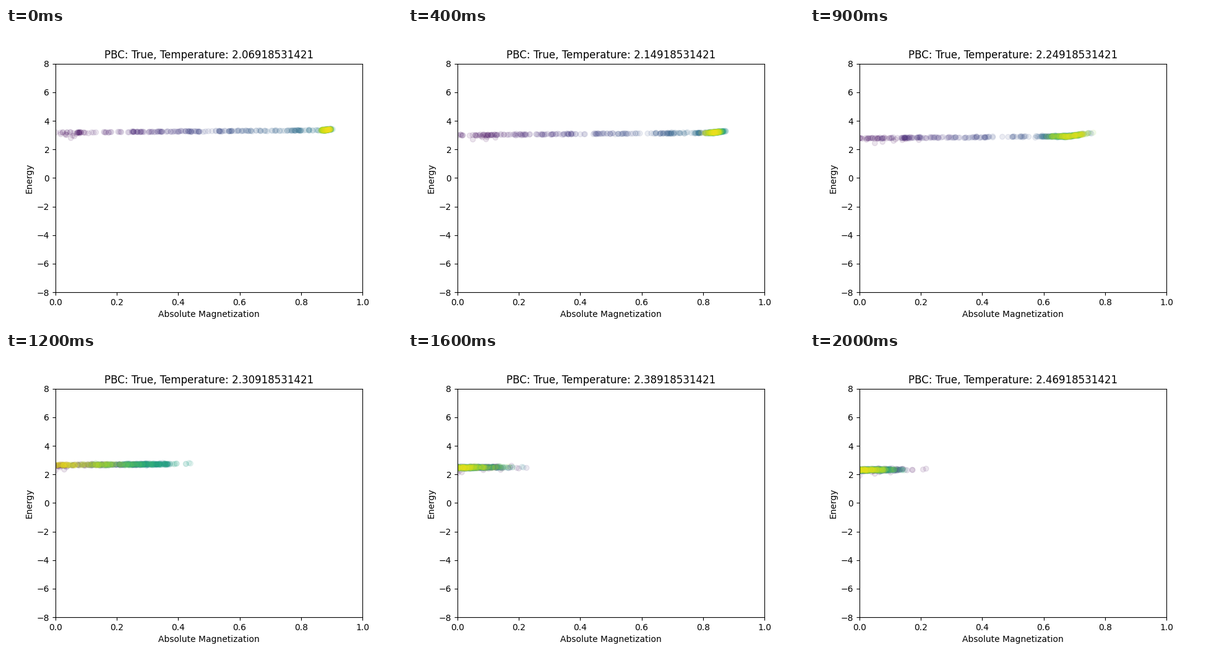
A matplotlib script for the animation above (2100 ms loop, 640 px wide and 480 px high).

```python
import numpy as np
import matplotlib.pyplot as plt
from matplotlib.animation import FuncAnimation

FRAMES, STEP_MS = 21, 100
SWEEPS = 600
T_CRIT = 2.26918531421
RAMP = 0.4  # share of the run spent ordering from a random start

t = np.linspace(0, 1, SWEEPS)


def temperature(i):
    return T_CRIT - 0.2 + 0.02 * i


def spontaneous(temp):
    """Onsager magnetization, nudged slightly for the finite lattice."""
    x = 1 - np.sinh(2 / (temp - 0.003)) ** -4
    return max(x, 0) ** 0.125


def correlated(rng, keep=0.8):
    """Unit-variance noise in which each sweep remembers the last one."""
    kicks = rng.normal(size=SWEEPS) * np.sqrt(1 - keep ** 2)
    x = np.zeros(SWEEPS)
    for n in range(1, SWEEPS):
        x[n] = keep * x[n - 1] + kicks[n]
    return x


def magnetization(i, m_eq, rng):
    noise = correlated(rng)
    if m_eq:
        # Ordering turns from steady to hesitant as T nears the transition.
        u = np.minimum(t / RAMP, 1)
        s = u - i / 10 * np.sin(2 * np.pi * u) / (2 * np.pi)
        path = 0.05 + (m_eq - 0.05) * s
        spread = 0.009 * np.exp(0.135 * i) + 0.035 * (1 - s)
    else:
        # One slow excursion that dies out as T rises.
        path = 0.32 * np.exp(-0.6 * (i - 12)) * np.sin(np.pi * t)
        spread = 0.06 * (1 + 0.8 * np.exp(-10 * t))
        if i < 14:
            spread = 0.045
    return np.abs(path + spread * noise)


def energy(i, m, m_eq, rng):
    e = 3.17 - 0.0435 * i + 0.2 * m
    if m_eq:
        e += 2.5 * np.maximum(m - m_eq + 0.01, 0)
    e -= 0.35 * np.exp(-np.arange(SWEEPS) / 4)
    return e + rng.normal(0, 0.02 + 0.001 * i, SWEEPS)


def sample(i):
    rng = np.random.default_rng(7 + i)
    m_eq = spontaneous(temperature(i))
    m = magnetization(i, m_eq, rng)
    return np.column_stack([m, energy(i, m, m_eq, rng)])


fig, ax = plt.subplots(figsize=(6.4, 4.8), dpi=100)
dots = ax.scatter(np.zeros(SWEEPS), np.zeros(SWEEPS), c=t,
                  cmap="viridis", alpha=0.1)
ax.set(xlim=(0, 1), ylim=(-8, 8),
       xlabel="Absolute Magnetization", ylabel="Energy")
title = ax.set_title("")


def draw(i):
    dots.set_offsets(sample(i))
    title.set_text(f"PBC: True, Temperature: {temperature(i):.11f}")
    return dots, title


anim = FuncAnimation(fig, draw, frames=FRAMES, interval=STEP_MS,
                     repeat=True, repeat_delay=0)
plt.show()
```
